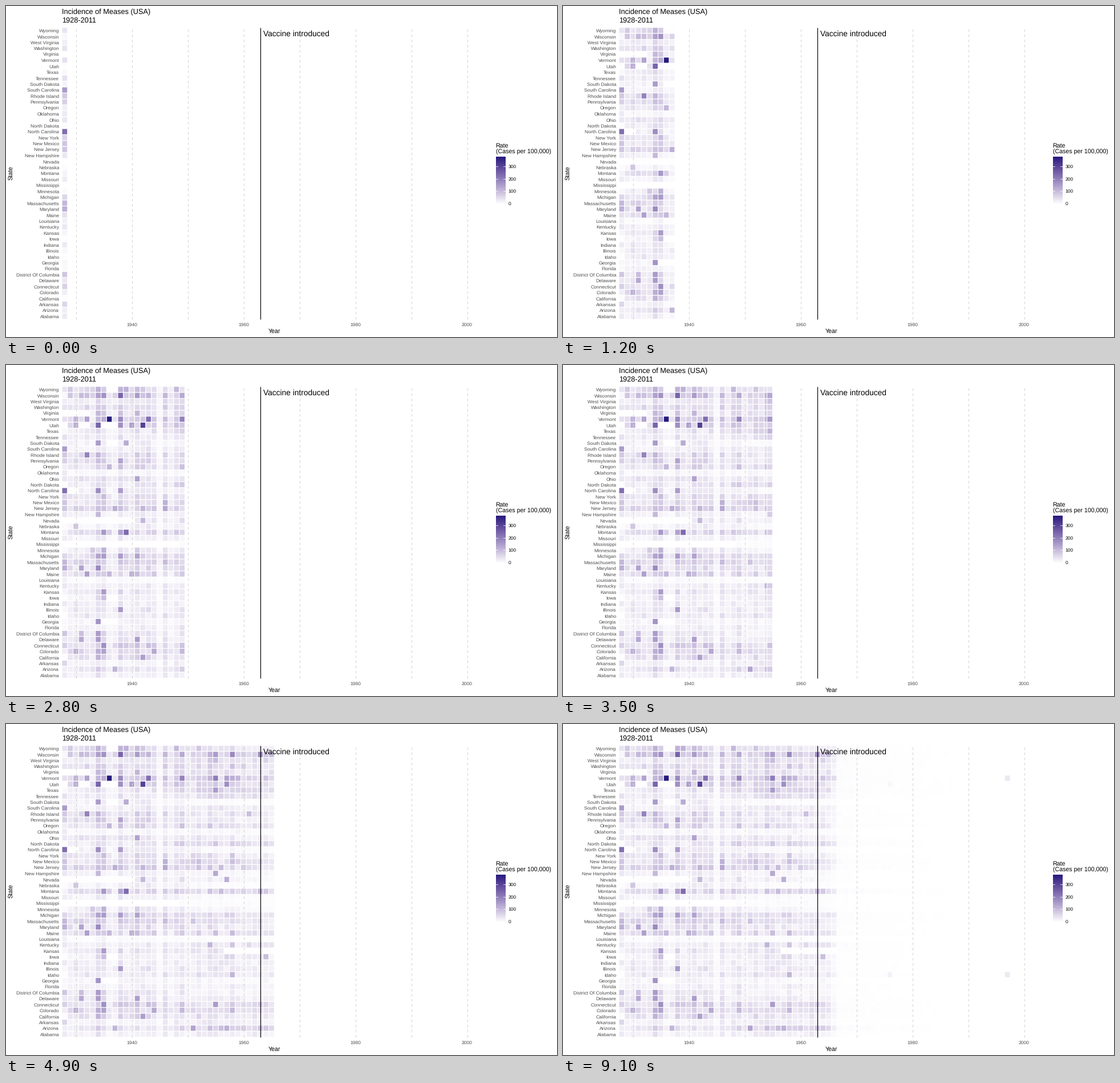
These frames come from a looping animation (966x580 px, 10000 ms). A matplotlib script:

```python
import numpy as np
import matplotlib.pyplot as plt
from matplotlib.animation import FuncAnimation
from matplotlib.collections import PolyCollection

W, H, DPI = 966, 580, 100
FRAMES, STEP = 100, 100
FIRST_YEAR, LAST_YEAR = 1928, 2003
X0, DX = 102.9, 9.8
Y0, DY = 42.9, 10.43
TOP_RATE = 370

plt.rcParams["font.family"] = "Liberation Sans"
plt.rcParams["text.hinting"] = "none"

# state: (level up to the mid 1940s, level from the mid 1950s)
LEVELS = {
    "Wyoming": (1.1, .9), "Wisconsin": (1.7, 2.1), "West Virginia": (.7, 1.2),
    "Washington": (1, 1.1), "Virginia": (.75, .9), "Vermont": (1.3, 1.8),
    "Utah": (1.2, 1.3), "Texas": (.6, 1.5), "Tennessee": (.5, 1),
    "South Dakota": (.35, .15), "South Carolina": (.45, .55),
    "Rhode Island": (.85, .8), "Pennsylvania": (1, .6), "Oregon": (.8, 1),
    "Oklahoma": (.25, .25), "Ohio": (.75, .65), "North Dakota": (.65, 1.3),
    "North Carolina": (.6, .2), "New York": (.8, .7), "New Mexico": (.9, 1.3),
    "New Jersey": (1.2, 1.1), "New Hampshire": (.45, .3), "Nevada": (.5, .35),
    "Nebraska": (.35, .15), "Montana": (1.1, 1.6), "Missouri": (.35, .2),
    "Mississippi": (.1, .15), "Minnesota": (.55, .3), "Michigan": (1.1, 1.3),
    "Massachusetts": (1.1, 1), "Maryland": (.9, .7), "Maine": (.9, 1.1),
    "Louisiana": (.15, .1), "Kentucky": (.45, .9), "Kansas": (.7, .8),
    "Iowa": (.4, .7), "Indiana": (.55, .6), "Illinois": (.6, .6),
    "Idaho": (.6, .9), "Georgia": (.3, .25), "Florida": (.4, .45),
    "District Of Columbia": (.7, .35), "Delaware": (.6, .6),
    "Connecticut": (1.1, 1.1), "Colorado": (1.1, 1.3), "California": (.9, .8),
    "Arkansas": (.35, .5), "Arizona": (.8, 1.5), "Alabama": (.35, .6),
}
STATES = list(LEVELS)

# rates in 1928, top row to bottom row
OPENING = [40, 12, 25, 40, 0, 45, 3, 10, 45, 18, 150, 80, 70, 25, 30, 35, 5,
           225, 65, 85, 85, 35, 0, 6, 18, 28, 0, 8, 60, 105, 120, 45, 22, 35,
           15, 4, 30, 12, 3, 12, 10, 85, 35, 70, 25, 5, 60, 25, 30]

# typical rate per year, 1929 to 1966
YEARLY = [42, 48, 48, 45, 42, 85, 75, 32, 32, 85, 48, 42, 75, 55, 62, 60, 16,
          65, 28, 58, 65, 30, 45, 58, 35, 58, 52, 42, 42, 60, 35, 38, 36, 42,
          34, 38, 30, 17]

# epidemic years that stand out
PEAKS = {
    "Wyoming": {1934: 115, 1939: 115, 1948: 105},
    "Wisconsin": {1935: 165, 1938: 240, 1958: 180, 1963: 170},
    "Virginia": {1934: 105, 1941: 110},
    "Vermont": {1932: 140, 1936: 370, 1938: 180, 1943: 225, 1949: 190,
                1955: 200, 1997: 33},
    "Utah": {1930: 120, 1934: 240, 1938: 170, 1940: 145, 1942: 300,
             1957: 170, 1976: 12},
    "South Dakota": {1934: 150, 1939: 125},
    "Rhode Island": {1932: 190, 1961: 95},
    "Pennsylvania": {1938: 140},
    "Oregon": {1936: 105},
    "Ohio": {1941: 140},
    "North Carolina": {1934: 175, 1938: 150},
    "New Jersey": {1937: 120},
    "New Hampshire": {1934: 105, 1955: 130},
    "Nevada": {1942: 105, 1957: 120},
    "Nebraska": {1930: 85},
    "Montana": {1935: 155, 1938: 140, 1939: 230},
    "Minnesota": {1933: 80, 1935: 115},
    "Michigan": {1935: 150, 1938: 150, 1941: 140},
    "Maryland": {1931: 140, 1934: 180},
    "Maine": {1932: 145, 1936: 105, 1940: 120},
    "Kentucky": {1954: 110},
    "Kansas": {1935: 150},
    "Iowa": {1935: 95, 1964: 95},
    "Illinois": {1938: 155},
    "Idaho": {1976: 20, 1997: 30},
    "Georgia": {1934: 165},
    "District Of Columbia": {1931: 95, 1934: 150},
    "Delaware": {1931: 130, 1934: 150, 1941: 150},
    "Connecticut": {1935: 170, 1955: 150},
    "Colorado": {1930: 115, 1935: 140},
    "California": {1942: 145},
    "Arizona": {1937: 110, 1951: 140},
}

# years (inclusive) with almost no reports
GAPS = [("Nevada", 1928, 1940), ("Mississippi", 1928, 1948),
        ("Kansas", 1957, 1966), ("Virginia", 1928, 1932),
        ("Georgia", 1935, 1937), ("Utah", 1935, 1937),
        ("Utah", 1931, 1932), ("Iowa", 1936, 1937),
        ("South Dakota", 1936, 1937), ("Wyoming", 1936, 1937),
        ("North Carolina", 1929, 1930)]


def make_rates():
    """Rates as an array of years by states."""
    rng = np.random.default_rng(7)
    years = np.arange(FIRST_YEAR, LAST_YEAR + 1)
    tail = 4 * np.exp(-.12 * (years[years > 1966] - 1967))
    typical = np.concatenate([[0], YEARLY, tail])
    early, late = np.array(list(LEVELS.values())).T
    mix = np.clip((years - 1944) / 10, 0, 1)[:, None]
    rates = typical[:, None] * (early + (late - early) * mix)
    rates = np.minimum(rates * rng.lognormal(-.04, .28, rates.shape), 150)
    rates[0] = OPENING
    for name, a, b in GAPS:
        rates[a - FIRST_YEAR:b - FIRST_YEAR + 1, STATES.index(name)] *= .05
    for name, peaks in PEAKS.items():
        for year, rate in peaks.items():
            rates[year - FIRST_YEAR, STATES.index(name)] = rate
    return rates


def ramp(rates):
    """White to dark blue, blended in Lab space."""
    t = np.clip(np.asarray(rates) / TOP_RATE, 0, 1)
    light, a, b = 100 + (18.4 - 100) * t, 37 * t, -54 * t
    fy = (light + 16) / 116
    f = np.stack([fy + a / 500, fy, fy - b / 200], -1)
    xyz = np.where(f > 6 / 29, f ** 3, (f - 4 / 29) * 108 / 841)
    xyz = xyz * [.9505, 1, 1.089]
    to_rgb = np.array([[3.2406, -1.5372, -.4986],
                       [-.9689, 1.8758, .0415],
                       [.0557, -.2040, 1.0570]])
    lin = np.clip(xyz @ to_rgb.T, 0, 1)
    srgb = np.where(lin > .0031308, 1.055 * lin ** (1 / 2.4) - .055,
                    12.92 * lin)
    return np.clip(srgb, 0, 1)


def px(size):
    return size * 72 / DPI


def year_x(year):
    return X0 + DX * (year - FIRST_YEAR)


def column(x):
    """Corners of one column of tiles centred on x."""
    y = Y0 + DY * np.arange(len(STATES))
    left, right = np.full_like(y, x - DX / 2), np.full_like(y, x + DX / 2)
    top, bottom = y - DY / 2, y + DY / 2
    return np.stack([np.stack([left, top], -1), np.stack([right, top], -1),
                     np.stack([right, bottom], -1),
                     np.stack([left, bottom], -1)], 1)


fig = plt.figure(figsize=(W / DPI, H / DPI), dpi=DPI, facecolor="white")
ax = fig.add_axes([0, 0, 1, 1])


def label(x, y, text, size, color="black", **kw):
    ax.text(x, y, text, fontsize=px(size), color=color, va="baseline", **kw)


SMALL, MEDIUM, LARGE = 8.5, 10.63, 12.75
GREY = "#4d4d4d"

# legend
ax.imshow(ramp(np.linspace(TOP_RATE, 0, 256))[:, None],
          extent=(858.6, 875.3, 347.3, 264.3), aspect="auto",
          interpolation="bilinear")
label(858.6, 247.6, "Rate", MEDIUM)
label(858.6, 258.6, "(Cases per 100,000)", MEDIUM)
for rate in (0, 100, 200, 300):
    y = 345.6 - .215 * rate
    label(880.5, y + 3.3, str(rate), SMALL)
    for x in (858.6, 872):
        ax.plot([x, x + 3.3], [y, y], color="white", lw=px(.8))

# axes and titles
label(98, 14.6, "Incidence of Meases (USA)", LARGE)
label(98, 28.6, "1928-2011", LARGE)
for i, name in enumerate(STATES):
    label(93.3, Y0 + DY * i + 3.2, name, SMALL, GREY, ha="right")
for year in range(1930, 2001, 10):
    ax.plot([year_x(year)] * 2, [548.8, 37.5], color="#d3d3d3", lw=px(1),
            dashes=(4.5, 4.5), dash_capstyle="butt", zorder=2.5)
    if year % 20 == 0:
        label(year_x(year), 561, str(year), SMALL, GREY, ha="center")
label(470.3, 573.2, "Year", MEDIUM, ha="center")
ax.text(13.4, 293, "State", fontsize=px(MEDIUM), rotation=90, ha="right",
        va="center")

ax.plot([year_x(1963)] * 2, [548.8, 37.5], color="black", lw=px(1.2),
        solid_capstyle="butt", zorder=3)
label(450.8, 53.2, "Vaccine introduced", 13.74, zorder=4)

# heat map
rates = make_rates()
count = len(rates)
colors = ramp(rates)
columns = np.array([column(X0 + DX * k) for k in range(count)])
marks = np.round(np.arange(count) * (FRAMES - 1) / (count - 1))

tiles = PolyCollection([], edgecolors="white", linewidths=px(1.1),
                       snap=False, zorder=1)
ax.add_collection(tiles, autolim=False)
ax.set_xlim(0, W)
ax.set_ylim(H, 0)
ax.axis("off")


def draw(frame):
    # settled columns, with the newest one gliding on to the next year
    past = int(np.sum(marks < frame))
    pos = np.interp(frame, marks, np.arange(count))
    k = min(int(pos), count - 2)
    moving = rates[k] + (rates[k + 1] - rates[k]) * (pos - k)
    verts = np.concatenate([columns[:past].reshape(-1, 4, 2),
                            column(X0 + DX * pos)])
    tiles.set_verts(verts)
    tiles.set_facecolor(np.concatenate([colors[:past].reshape(-1, 3),
                                        ramp(moving)]))
    return [tiles]


anim = FuncAnimation(fig, draw, frames=FRAMES, interval=STEP, repeat=True,
                     repeat_delay=0, init_func=lambda: draw(0))
plt.show()
```
